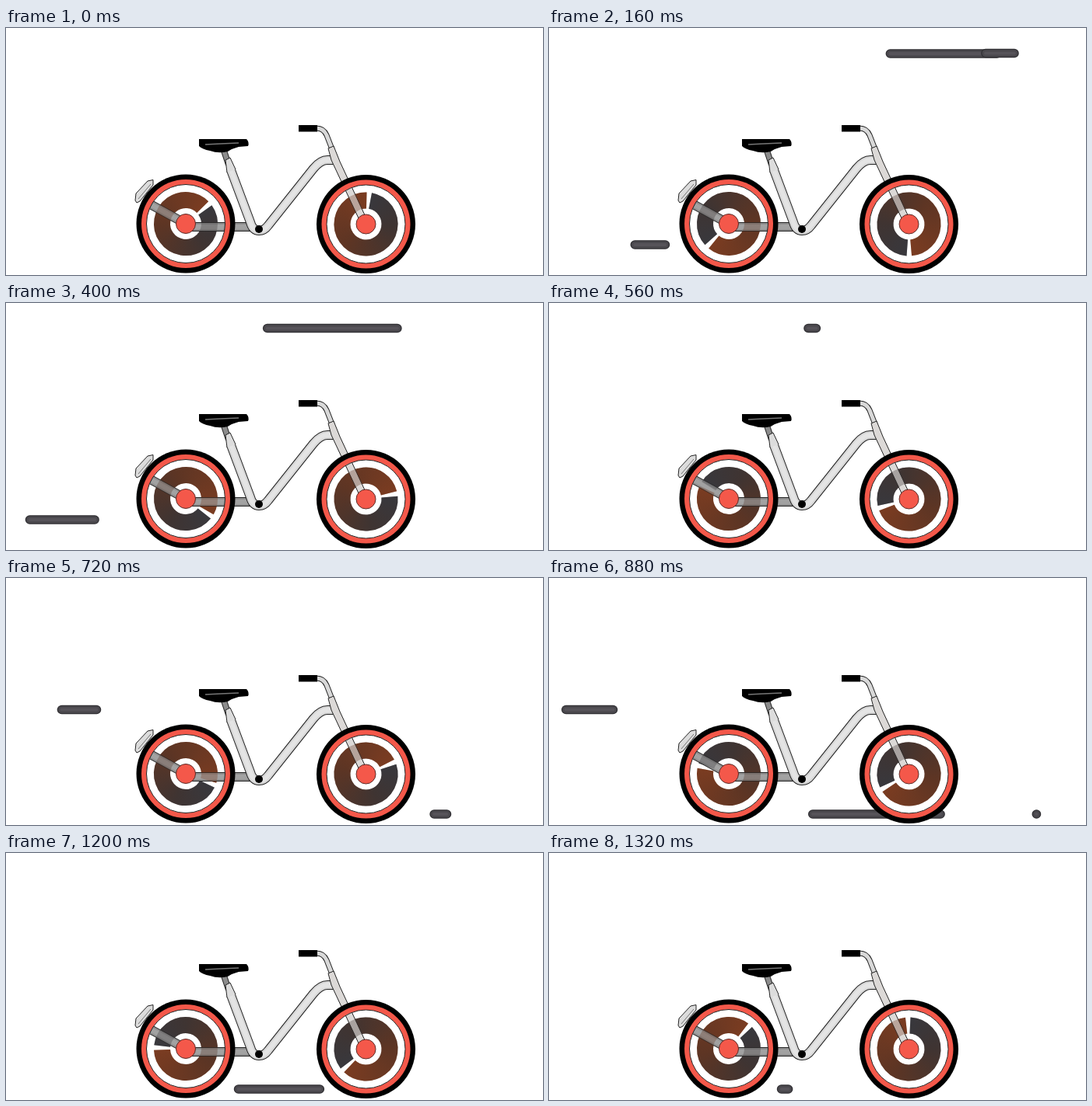
An HTML page with a canvas that plays this animation: 690 by 318 pixels, repeating every 1360 ms.

```html
<!DOCTYPE html>
<html lang="en">
<head>
<meta charset="utf-8">
<title>Riding bicycle</title>
<style>
  html, body { margin: 0; width: 100%; height: 100%; overflow: hidden; background: #fff; }
  canvas { display: block; }
</style>
</head>
<body>
<canvas id="stage" width="690" height="318"></canvas>
<script>
const ctx = document.getElementById('stage').getContext('2d');
const LOOP = 1360, STEP = 40, TURN_PER_STEP = 43.4;
const REAR = { x: 231, y: 252 }, FRONT = { x: 462.5, y: 252.5 };
const HALF_GAP = 0.08;

// Each streak: head leaves "from" and reaches "to" first, the tail follows.
const streaks = [
  { y: 33, from: 659.5, to: 430, head: [5, 180], tail: [40, 333] },
  { y: 32.5, from: 598, to: 333, head: [80, 420], tail: [264, 600] },
  { y: 279, from: 149.5, to: 9.5, head: [42, 463], tail: [331, 541], steady: true },
  { y: 169.5, from: 116.5, to: 15.5, head: [575, 900], tail: [778, 1040], steady: true },
  { y: 304, from: 566.5, to: 332.5, head: [685, 901], tail: [775, 1082] },
  { y: 304, from: 626.5, to: 298.5, head: [875, 1191], tail: [931, 1363] }
];

const progress = (t, [start, end]) => Math.min(1, Math.max(0, (t - start) / (end - start)));
const smooth = u => u * u * (3 - 2 * u);

function stroke(path, width, color, cap = 'butt') {
  ctx.lineWidth = width;
  ctx.strokeStyle = color;
  ctx.lineCap = cap;
  ctx.lineJoin = 'round';
  ctx.stroke(path);
}

function fill(path, color, edge) {
  ctx.fillStyle = color;
  ctx.fill(path);
  if (edge) stroke(path, 1, edge);
}

function arc({ x, y }, r, start = 0, end = Math.PI * 2) {
  const p = new Path2D();
  p.arc(x, y, r, start, end);
  return p;
}

const disc = (c, r, color, edge) => fill(arc(c, r), color, edge);

function tube(d, width, color, shine) {
  const p = new Path2D(d);
  stroke(p, width, '#222');
  stroke(p, width - 2, color);
  if (shine) stroke(p, width - 6, shine);
}

function drawStreak(s, t) {
  if (t < s.head[0] || t > s.tail[1]) return;
  const at = u => s.from + (s.to - s.from) * u;
  const u = progress(t, s.head);
  const head = at(s.steady ? u : smooth(u));
  const tail = at(smooth(progress(t, s.tail)));
  const p = new Path2D(`M${head} ${s.y}H${tail + 0.01}`);
  stroke(p, 11.5, '#302f33', 'round');
  stroke(p, 9, '#4a484d', 'round');
  stroke(p, 4, '#565359', 'round');
}

// The tubes show through the tinted disc but stay behind rim and tyre.
function drawWheel(c, degrees, drawTubes) {
  const a = degrees * Math.PI / 180;
  const shade = ctx.createConicGradient(a, c.x, c.y);
  shade.addColorStop(0, '#38383d');
  shade.addColorStop(0.25, '#3f3432');
  shade.addColorStop(0.6, '#5d3524');
  shade.addColorStop(1, '#7b3c21');
  const band = arc(c, 30.5, a + HALF_GAP, a + Math.PI * 2 - HALF_GAP);
  disc(c, 63.5, '#000');
  disc(c, 57, '#f4584a');
  disc(c, 50.5, '#fff');
  stroke(band, 21, shade);
  ctx.save();
  ctx.clip(arc(c, 50.5));
  drawTubes();
  ctx.globalAlpha = 0.33;
  stroke(band, 21, shade);
  ctx.restore();
  stroke(arc(c, 50.5), 1, '#222');
  disc(c, 12.5, '#f4584a', '#5a2a26');
}

function drawStays() {
  tube('M180 224L231 252', 12, '#8f8f8f', '#a2a2a2');
  tube('M231 256H314', 12, '#8f8f8f', '#a2a2a2');
}

function drawFork() {
  fill(new Path2D('M414 155L421 152L429 172L462 243L454 247L418 170Z'), '#dcd9d7', '#222');
}

function drawSeat() {
  tube('M280 158L286 176', 8, '#8c8c8c');
  fill(new Path2D('M248 143H309Q313 147 311 152L299 153Q291 155 285 159Q273 162 262 158Q252 156 248 152Z'), '#000');
  stroke(new Path2D('M256 150Q275 149 299 148'), 1.5, '#777');
}

function drawFrame() {
  tube('M289 183L314 250Q317 261 325 261Q332 261 337 254L395 181Q404 170 413 170H425', 12, '#d6d6d6', '#e4e4e4');
  fill(new Path2D('M282 170L288 167L295 182L284 186Z'), '#dcdcdc');
  stroke(new Path2D('M284 186L282 170L288 167L295 182'), 1, '#222');
  disc({ x: 325, y: 259 }, 5, '#000');
}

function drawHandlebar() {
  tube('M399 129Q408 129 412 138L419 156', 7, '#d8d8d8');
  ctx.fillStyle = '#000';
  ctx.fillRect(376, 125, 24, 8.5);
}

function drawReflector() {
  fill(new Path2D('M166 222L167 213L182 197L189 195.5L189 202L172 223L168 225Z'), '#dcdcdc', '#222');
  stroke(new Path2D('M170 220L186 201'), 1, '#777');
}

function draw() {
  const t = Math.floor(performance.now() % LOOP / STEP) * STEP;
  const turn = t / STEP * TURN_PER_STEP;
  ctx.clearRect(0, 0, 690, 318);
  streaks.forEach(s => drawStreak(s, t));
  drawReflector();
  drawStays();
  drawWheel(REAR, turn - 40, drawStays);
  drawSeat();
  drawFrame();
  drawHandlebar();
  drawFork();
  drawWheel(FRONT, turn - 84, drawFork);
  requestAnimationFrame(draw);
}
draw();
</script>
</body>
</html>
```
